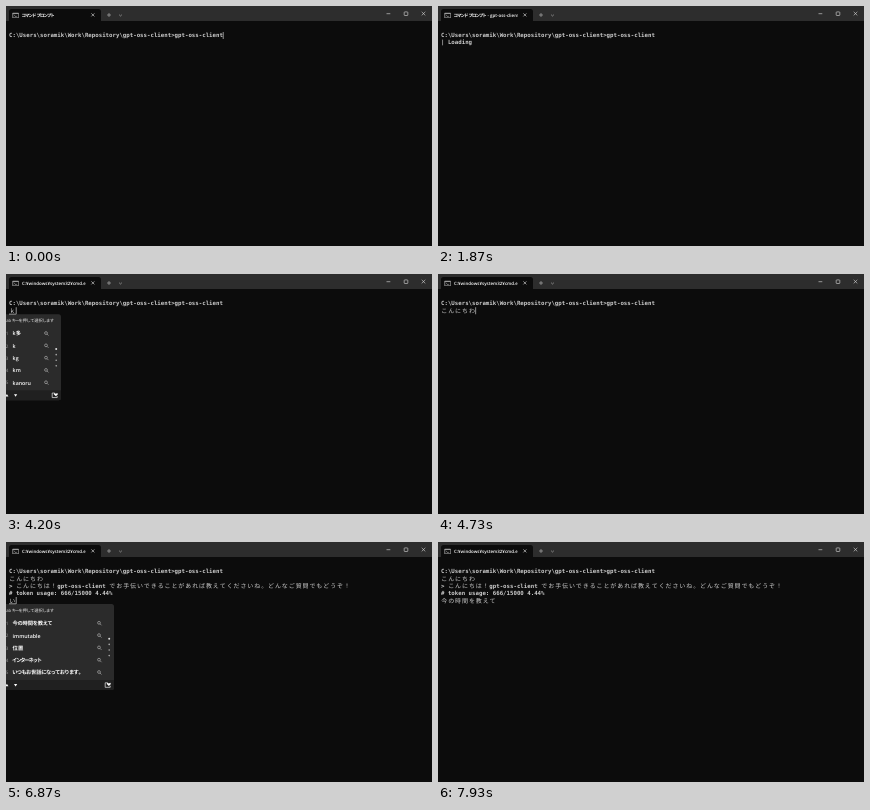
Animation of 426 by 240 pixels, one loop 8 s. Source, as an HTML page with a canvas:

```html
<!DOCTYPE html>
<html lang="ja">
<head>
<meta charset="utf-8">
<style>
html, body { margin: 0; height: 100%; overflow: hidden; background: #0c0c0c; }
canvas { display: block; width: 426px; height: 240px; }
</style>
</head>
<body>
<canvas id="stage" width="426" height="240"></canvas>
<script>
const ctx = document.getElementById('stage').getContext('2d');
ctx.textRendering = 'geometricPrecision';

const LOOP = 8000, FRAME = 1000 / 15;
const CELL = 3.45, ROW = 7.25, LEFT = 3;
const GREY = '#ccc', WHITE = '#fff';
const COMMAND = 'gpt-oss-client';
const PROMPT = 'C:\\Users\\soramik\\Work\\Repository\\gpt-oss-client>' + COMMAND;
const GREETING = 'こんにちわ', QUESTION = '今の時間を教えて';
const REPLY = '> こんにちは！gpt-oss-client でお手伝いできることがあれば教えてくださいね。どんなご質問でもどうぞ！';
const USAGE = '# token usage: 666/15000 4.44%';
const PICK_HINT = 'Tab キーを押して選択します';
const DELETE_HINT = 'Ctrl + Del キーを押して履歴から削除します';

const K_LIST = ['k多', 'k', 'kg', 'km', 'kanoru'];
const KO_LIST = [GREETING, 'こと', 'これ', 'ここ', 'こちらこそどうも'];
const I_LIST = [QUESTION, 'immutable', '位置', 'インターネット', 'いつもお世話になっております。'];
const IMA_LIST = [QUESTION, '今', 'いま', '今から', '今まで'];

// Input method steps: start, end, row, composed text, candidates, popup width, selected
const COMPOSING = [
  [4200, 4330, 1, 'ｋ', K_LIST, 55],
  [4330, 4600, 1, 'こ', KO_LIST, 77],
  [4600, 4730, 1, GREETING, KO_LIST, 84, true],
  [6870, 6930, 4, 'い', I_LIST, 108],
  [6930, 7000, 4, 'いｍ', I_LIST, 108],
  [7000, 7070, 4, 'いま', IMA_LIST, 84],
  [7070, 7400, 4, QUESTION, IMA_LIST, 84, true],
];

const isWide = ch => ch > '\u2fff';
const cells = text => [...text].reduce((n, ch) => n + (isWide(ch) ? 2 : 1), 0);

function rect(x, y, w, h, color, radius = 0) {
  ctx.fillStyle = color;
  ctx.beginPath();
  ctx.roundRect(x, y, w, h, radius);
  ctx.fill();
}

function stroke(color, width, ...paths) {
  ctx.strokeStyle = color;
  ctx.lineWidth = width;
  ctx.beginPath();
  for (const path of paths)
    path.forEach(([x, y], i) => i ? ctx.lineTo(x, y) : ctx.moveTo(x, y));
  ctx.stroke();
}

function polygon(color, ...points) {
  ctx.fillStyle = color;
  ctx.beginPath();
  points.forEach(p => ctx.lineTo(...p));
  ctx.fill();
}

// Terminal text: every character sits on the cell grid
function print(row, text, col = 0) {
  ctx.fillStyle = GREY;
  for (const ch of text) {
    const wide = isWide(ch);
    ctx.font = wide ? '6px "Noto Sans CJK JP", sans-serif' : 'bold 5.73px "DejaVu Sans Mono", monospace';
    ctx.fillText(ch, LEFT + col * CELL + (wide ? 0.3 : 0), (wide ? 31.5 : 31.2) + row * ROW);
    col += wide ? 2 : 1;
  }
}

function cursor(row, col = 0) {
  rect(LEFT + col * CELL - 0.1, 25.9 + row * ROW, 0.7, 7.1, GREY);
}

// Interface text with proportional kana
function label(text, x, y, size, color, weight = 500) {
  ctx.font = `${weight} ${size}px "Open Sans", "Noto Sans CJK JP", sans-serif`;
  ctx.fillStyle = color;
  for (const ch of text) {
    const full = ctx.measureText(ch).width;
    const ratio = ch === '。' ? 0.5 : /[ァ-ヿ]/.test(ch) ? 0.78 : /[ぁ-ゟ]/.test(ch) ? 0.87 : 1;
    ctx.fillText(ch, x - (ch === '。' ? 0 : full * (1 - ratio) / 2), y);
    x += full * ratio;
  }
}

function titleBar(title) {
  rect(0, 0, 426, 15, '#2d2d2d');
  rect(3, 3, 92, 13, '#0c0c0c', [2.5, 2.5, 0, 0]);
  rect(6.3, 6.8, 6.6, 5.2, '#999', 0.6);
  rect(6.9, 8, 5.4, 3.4, '#111');
  stroke('#ccc', 0.5, [[7.5, 8.6], [8.5, 9.4], [7.5, 10.2]], [[9, 10.4], [10.8, 10.4]]);
  ctx.save();
  ctx.beginPath();
  ctx.rect(16, 3, 63.6, 12);
  ctx.clip();
  label(title, 16, 10.8, 4.45, WHITE, 600);
  ctx.restore();
  stroke('#ccc', 0.7,
    [[85.4, 7.4], [88.4, 10.4]], [[88.4, 7.4], [85.4, 10.4]]);
  stroke('#bbb', 0.6,
    [[101, 9], [105, 9]], [[103, 7], [103, 11]],
    [[113.1, 8.7], [114.5, 10], [115.9, 8.7]]);
  stroke('#ddd', 0.6,
    [[380.5, 7.7], [384.3, 7.7]],
    [[415.7, 5.8], [419.3, 9.4]], [[419.3, 5.8], [415.7, 9.4]]);
  ctx.beginPath();
  ctx.roundRect(398.2, 5.9, 3.6, 3.6, 0.6);
  ctx.stroke();
}

function magnifier(x, y) {
  ctx.strokeStyle = '#bbb';
  ctx.lineWidth = 0.6;
  ctx.beginPath();
  ctx.arc(x - 0.4, y - 0.4, 1.4, 0, 7);
  ctx.moveTo(x + 0.6, y + 0.6);
  ctx.lineTo(x + 2.1, y + 2.1);
  ctx.stroke();
}

function popup(top, width, list, selected) {
  rect(-6, top, width + 6, 86, '#2b2b2b', 2.5);
  rect(-6, top + 76, width + 6, 10, '#202020', [0, 0, 2.5, 2.5]);
  if (selected) rect(0, top + 14, width - 9, 11.5, '#3a3a3a', 1);
  label(selected ? DELETE_HINT : PICK_HINT, -2.2, top + 8, 4.25, '#e4e4e4');
  list.forEach((word, i) => {
    const y = top + 19.2 + i * 12.3;
    label(String(i + 1), -0.2, y + 1.8, 4.6, '#999');
    label(word, 6.6, y + 2, 5.3, WHITE, 600);
    magnifier(width - 14.6, y);
  });
  for (let i = 0; i < 4; i++) {
    const r = i ? 0.8 : 1;
    rect(width - 4.8 - r, top + 34.8 + i * 5.6 - r, 2 * r, 2 * r, i ? '#aaa' : '#ddd', r);
  }
  const y = top + 81;
  polygon(WHITE, [-0.6, y + 1.2], [2.4, y + 1.2], [0.9, y - 1.2]);
  polygon(WHITE, [8, y - 1], [11.2, y - 1], [9.6, y + 1.4]);
  const x = width - 6.3;
  stroke('#eee', 0.7, [[x, y - 2.2], [x - 2.5, y - 2.2], [x - 2.5, y + 2.3], [x + 2.5, y + 2.3], [x + 2.5, y + 0.8]]);
  polygon(WHITE, [x + 1.2, y + 1], [x - 0.9, y - 1], [x - 0.4, y - 2.3], [x + 1.2, y - 1.6], [x + 2.6, y - 2.3], [x + 3.2, y - 1]);
}

function spinner(row, t, start) {
  const elapsed = Math.round((t - start) / FRAME - 0.45) * FRAME;
  const step = Math.floor(0.7 + elapsed / 80);
  print(row, '\\|/-'[step % 4] + ' Loading');
}

function draw(t) {
  const during = (from, to) => t >= from && t < to;
  rect(0, 0, 426, 240, '#0c0c0c');
  titleBar(t < 130 ? 'コマンド プロンプト'
    : t < 1930 ? 'コマンド プロンプト - gpt-oss-client'
    : 'C:¥windows¥system32¥cmd.exe');

  print(0, PROMPT);
  if (t < 130) cursor(0, PROMPT.length);
  if (during(130, 1130) || during(2670, 4200)) cursor(1);
  if (during(1130, 2670)) spinner(1, t, 1130);

  if (t >= 4730) print(1, GREETING);
  if (during(4730, 4930)) cursor(1, cells(GREETING));
  if (during(4930, 5000)) cursor(2);
  if (during(5000, 5330)) spinner(2, t, 5000);

  if (t >= 5600) print(2, REPLY);
  if (t >= 5670) print(3, USAGE);
  if (during(5670, 6870)) cursor(4);
  if (t >= 7400) print(4, QUESTION);
  if (during(7400, 7800)) cursor(4, cells(QUESTION));
  if (during(7800, 7930)) cursor(5);

  const input = COMPOSING.find(([from, to]) => during(from, to));
  if (input) {
    const [, , row, text, list, width, selected] = input;
    popup(33 + row * ROW, width, list, selected);
    print(row, text);
    rect(LEFT, 32.5 + row * ROW, cells(text) * CELL, 0.7, GREY);
    cursor(row, cells(text));
  }
}

function tick() {
  draw(performance.now() % LOOP);
  requestAnimationFrame(tick);
}
tick();
</script>
</body>
</html>
```
